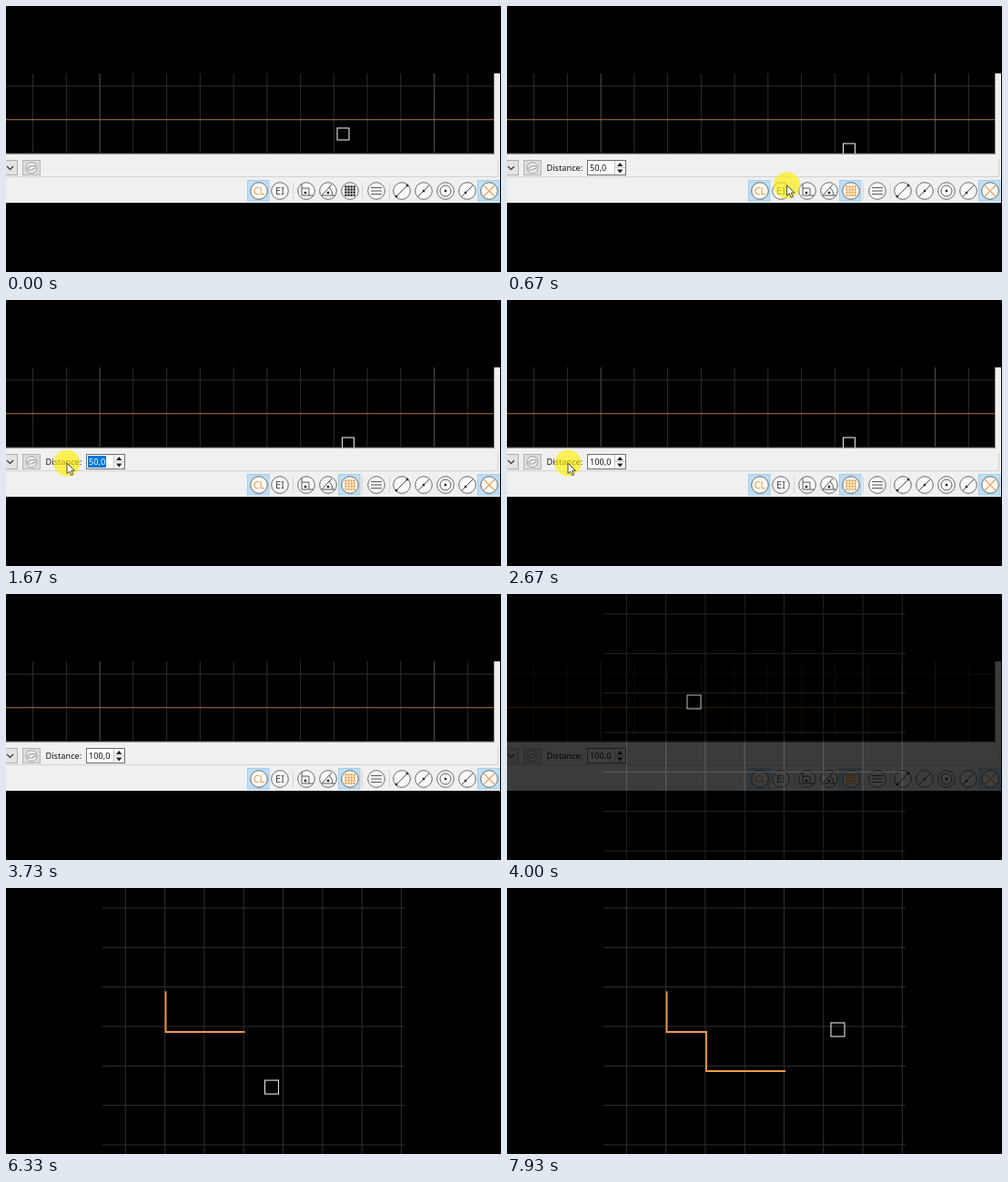
Recreate the animation shown at these times as an HTML page. Size 544 by 292 pixels, loop 8000 ms.

```html
<!DOCTYPE html>
<html lang="en">
<head>
<meta charset="utf-8">
<title>Drawing on a snap grid</title>
<style>
  html, body { margin: 0; width: 100%; height: 100%; overflow: hidden; background: #000; }
  svg { display: block; width: 544px; height: 292px; }
  text { font-family: "Noto Sans", "Open Sans", sans-serif; }
  .field { font-size: 9.2px; fill: #111; }
  .line { fill: none; stroke: #555; stroke-width: 1; }
  .disc { fill: #fbfbfb; stroke: #666; stroke-width: 1; }
  .on { fill: #bfdff6; stroke: #a4cdeb; stroke-width: 1; }
  .pick { fill: none; stroke: #e4e4e4; stroke-width: 1.1; }
</style>
</head>
<body>
<svg viewBox="0 0 544 292">
  <defs>
    <clipPath id="view"><rect x="0" y="74" width="536" height="88"/></clipPath>
    <clipPath id="window"><rect x="0" y="74" width="543" height="142"/></clipPath>
  </defs>
  <rect width="544" height="292"/>

  <g id="app" clip-path="url(#window)">
    <rect y="74" width="543" height="142" fill="#f0f0f0"/>
    <rect y="74" width="536" height="88"/>
    <g clip-path="url(#view)">
      <g id="viewGrid"></g>
      <path d="M0 124.8H536" stroke="#b5762c" stroke-width="1.1"/>
      <rect id="viewPick" class="pick" x="-6.5" y="-6.5" width="13" height="13"/>
    </g>
    <path d="M536.5 74V162M0 162.5H537" stroke="#9a9a9a" fill="none"/>
    <path d="M0 187.5H541M540.5 168V187" stroke="#d2d2d2" fill="none"/>

    <rect x="-10" y="169.5" width="22.5" height="16" fill="#e3e3e3" stroke="#adadad"/>
    <path d="M1 176l3.5 3.5L8 176" stroke="#333" stroke-width="1.2" fill="none"/>
    <rect x="18.5" y="169.5" width="19" height="16" fill="#dcdcdc" stroke="#b4b4b4"/>
    <circle cx="28" cy="177.7" r="6" fill="#eee" stroke="#a0a0a0"/>
    <path d="M24 180v-3h2.5v-1.5H32v3h-2.500v1.500z" stroke="#a0a0a0" fill="none"/>

    <g id="distance">
      <text class="field" x="43.500" y="181">Distance:</text>
      <rect x="88.500" y="169.500" width="42" height="16" fill="#fff" stroke="#6e6e6e"/>
      <path d="M118.500 170V185M119 177.500H130" stroke="#c4c4c4"/>
      <path d="M121 176h6.500l-3.250-4zM121 179.500h6.500l-3.250 4z" fill="#222"/>
      <rect id="mark" x="90" y="171" width="20" height="13" fill="#0078d7"/>
      <text id="value" class="field" x="91" y="181"></text>
    </g>

    <g id="tools"></g>
    <g id="pointer">
      <circle r="14.5" fill="#ffee00" opacity=".65"/>
      <path d="M0 0V11.500L2.700 9.100L4.700 13.500L6.600 12.700L4.700 8.400H8.300Z" fill="#fff" stroke="#333" stroke-width=".9"/>
    </g>
  </g>

  <g id="sheet">
    <rect width="544" height="292"/>
    <path id="sheetGrid" stroke="#303030" fill="none"/>
    <polyline id="trace" fill="none" stroke="#ec9a3c" stroke-width="1.9"/>
    <rect id="sheetPick" class="pick" x="-7.500" y="-7.500" width="15" height="15"/>
  </g>
</svg>

<script>
const LOOP = 8000, TICK = 1000 / 15;
const $ = id => document.getElementById(id);

// Static parts
let lines = "";
for (let i = 0; i < 14; i++) {
  const x = 29.6 + 36.75 * i;
  lines += `<path d="M${x} 74V162" stroke="${i % 10 === 2 ? "#565656" : "#2e2e2e"}"/>`;
}
for (const y of [88, 161.500]) lines += `<path d="M0 ${y}H536" stroke="#2e2e2e"/>`;
$("viewGrid").innerHTML = lines;

let mesh = "";
for (let i = 0; i < 8; i++) mesh += `M${131.3 + 43.3 * i} 0V292`;
for (let i = 0; i < 7; i++) mesh += `M106 ${22 + 43.33 * i}H438`;
$("sheetGrid").setAttribute("d", mesh);

const path = d => `<path class="line" d="${d}"/>`;
const dot = (x, y) => `<rect x="${x - 1.2}" y="${y - 1.2}" width="2.4" height="2.4" fill="#222"/>`;
const label = (s, color) =>
  `<text text-anchor="middle" y="4" font-size="11" font-weight="500" fill="${color}">${s}</text>`;
const dots = () => {
  let s = "";
  for (let i = 0; i < 16; i++)
    s += `<rect x="${-5.7 + 3.1 * (i % 4)}" y="${-5.7 + 3.1 * (i >> 2)}" width="2.2" height="2.2"/>`;
  return `<g id="dots">${s}</g>`;
};
const slash = path("M-6.500 6.500L6.500-6.500");

const tools = [
  [278, label("CL", "#e8963c"), "on"],
  [301, label("EI", "#444")],
  [330, path("M-5-8V5H8M-5-3H3V5") + dot(-1, 2)],
  [354, path("M4-7L-7 5H8M1-4Q5 0 5 5") + dot(0, 2)],
  [378, dots(), "grid"],
  [407, path("M-6-3.500H6M-6 0H6M-6 3.500H6")],
  [435, slash + dot(-6, 6) + dot(6, -6)],
  [459, slash + dot(0, 0)],
  [483, '<circle class="line" r="6"/>' + dot(0, 0)],
  [507, slash + dot(-2, 2)],
  [531, '<path d="M-6-6L6 6M-6 6L6-6" stroke="#e8a45c" stroke-width="1.2"/>', "on"]
];
$("tools").innerHTML = tools.map(([x, art, state]) =>
  `<g transform="translate(${x} 203)">` +
  (state ? `<rect ${state === "grid" ? 'id="gridOn"' : ""} class="on" x="-12.500" y="-11.500" width="23.500" height="22.500"/>` : "") +
  `<circle class="disc" r="9.300"/>${art}</g>`).join("") +
  '<path d="M315.500 194V212M391.500 194V212M421.500 194V212" stroke="#d6d6d6"/>';

// Motion tables: [ms, x, y]
const viewMoves = [[0, 370.5, 140.5], [130, 372, 144], [267, 376, 157.5]];
const pointerMoves = [
  [330, 376, 172], [467, 378, 200], [600, 378, 200], [867, 96, 187], [1000, 89.500, 188],
  [1200, 110, 178], [1330, 110, 178], [1667, 67, 179], [2667, 67, 179], [3333, 130, 232]
];
const sheetMoves = [
  [4070, 205.5, 118.5], [4200, 205.500, 118.500], [4267, 205.5, 120], [4400, 205.500, 120],
  [4667, 177, 113], [4733, 175.5, 112], [4800, 175.5, 114], [4867, 175.5, 119.5],
  [5000, 186, 165], [5133, 194.500, 209], [5200, 194.5, 209], [5400, 195.5, 218.500],
  [5533, 195.500, 218.5], [5933, 292, 218.5], [6333, 292, 218.5], [6600, 280, 279.5],
  [6933, 280, 279.5], [7133, 366, 275.5], [7400, 366, 275.5], [7933, 363.5, 155.5]
];

// State tables: [ms, value]
const values = [[0, "50,0"], [1800, "1"], [2067, "10"], [2200, "100"], [2400, "100,0"]];
const start = "175.5,113.5 175.5,158 ";
const traces = [
  [0, ""],
  [4867, start],
  [5667, start + "219,158"],
  [5867, start + "262.5,158"],
  [6467, start + "219,158 219,201"],
  [7067, start + "219,158 219,201 262.5,201"],
  [7667, start + "219,158 219,201 306,201"]
];

const stateAt = (table, t) => table.filter(row => row[0] <= t + 4).pop()[1];

function posAt(moves, t) {
  const i = moves.findIndex(m => m[0] > t);
  if (i < 0) return moves[moves.length - 1].slice(1);
  if (i === 0) return moves[0].slice(1);
  const [t0, x0, y0] = moves[i - 1], [t1, x1, y1] = moves[i];
  const k = (t - t0) / (t1 - t0);
  return [x0 + (x1 - x0) * k, y0 + (y1 - y0) * k];
}

const place = (id, moves, t) =>
  $(id).setAttribute("transform", `translate(${posAt(moves, t).join(" ")})`);
const show = (id, on) => $(id).setAttribute("visibility", on ? "inherit" : "hidden");

function draw(time) {
  const t = Math.floor((time % LOOP + 4) / TICK) * TICK;
  place("viewPick", viewMoves, t);
  place("pointer", pointerMoves, t);
  place("sheetPick", sheetMoves, t);

  const snap = t >= 530, marked = t >= 1400 && t < 1795;
  show("viewPick", t < 3330);
  show("pointer", t >= 330 && t < 3330);
  show("distance", snap);
  show("gridOn", snap);
  show("mark", marked);
  $("dots").setAttribute("fill", snap ? "#e8a23c" : "#111");
  $("value").style.fill = marked ? "#fff" : "#111";
  $("value").textContent = stateAt(values, t);
  $("trace").setAttribute("points", stateAt(traces, t));

  // Short dissolve between the two views
  const fade = Math.min(1, Math.max(0, (t - 3800) / 265));
  $("sheet").setAttribute("opacity", fade);
}

const begin = performance.now();
function loop() {
  draw(performance.now() - begin);
  requestAnimationFrame(loop);
}
loop();
</script>
</body>
</html>
```
